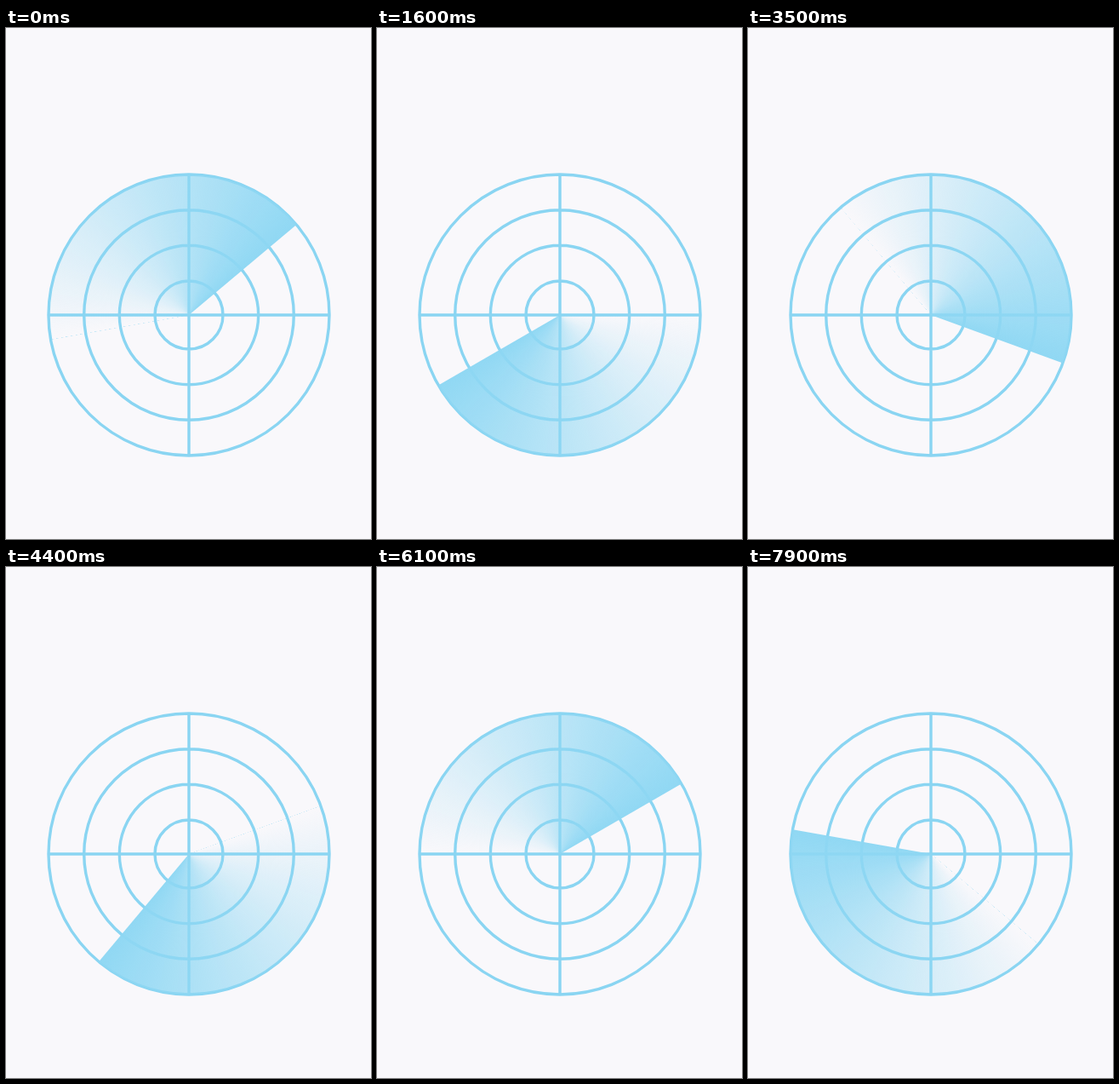
Recreate the animation shown at these times as an HTML page with a canvas. Size 429 px wide and 600 px high, loop 8 s.

```html
<!DOCTYPE html>
<html lang="en">
<head>
<meta charset="utf-8">
<title>Radar sweep</title>
<style>
html, body { margin: 0; width: 100%; height: 100%; overflow: hidden; background: #f9f8fb; }
canvas { display: block; }
</style>
</head>
<body>
<canvas id="stage" width="429" height="600"></canvas>
<script>
const ctx = document.getElementById('stage').getContext('2d');
const CX = 215, CY = 337, RADIUS = 165, TAIL = 150;
const RINGS = [40, 81.7, 123.3, RADIUS];
const LOOP = 8000, STEP = 100;
const rad = deg => deg * Math.PI / 180;

function drawGrid() {
  ctx.strokeStyle = '#8ad5f2';
  ctx.lineWidth = 3.4;
  ctx.beginPath();
  for (const r of RINGS) {
    ctx.moveTo(CX + r, CY);
    ctx.arc(CX, CY, r, 0, 2 * Math.PI);
  }
  ctx.moveTo(CX - RADIUS, CY);
  ctx.lineTo(CX + RADIUS, CY);
  ctx.moveTo(CX, CY - RADIUS);
  ctx.lineTo(CX, CY + RADIUS);
  ctx.stroke();
}

// heading: degrees clockwise from the top
function drawSweep(heading) {
  const end = rad(heading - 90), start = end - rad(TAIL);
  const fade = ctx.createConicGradient(start, CX, CY);
  fade.addColorStop(0, 'rgba(142, 215, 243, 0)');
  fade.addColorStop(TAIL / 360, 'rgba(142, 215, 243, 0.98)');
  fade.addColorStop(1, 'rgba(142, 215, 243, 0.98)');
  ctx.fillStyle = fade;
  ctx.beginPath();
  ctx.moveTo(CX, CY);
  ctx.arc(CX, CY, RADIUS, start, end);
  ctx.fill();
}

function draw(now) {
  const tick = Math.floor(now % LOOP / STEP);
  // 12 degrees per tick, snapped to the nearest 10
  const heading = Math.round((50 + 12 * tick) / 10) * 10 % 360;
  ctx.clearRect(0, 0, 429, 600);
  drawGrid();
  drawSweep(heading);
}

const begin = performance.now();
function loop() {
  draw(performance.now() - begin);
  requestAnimationFrame(loop);
}
loop();
</script>
</body>
</html>
```
